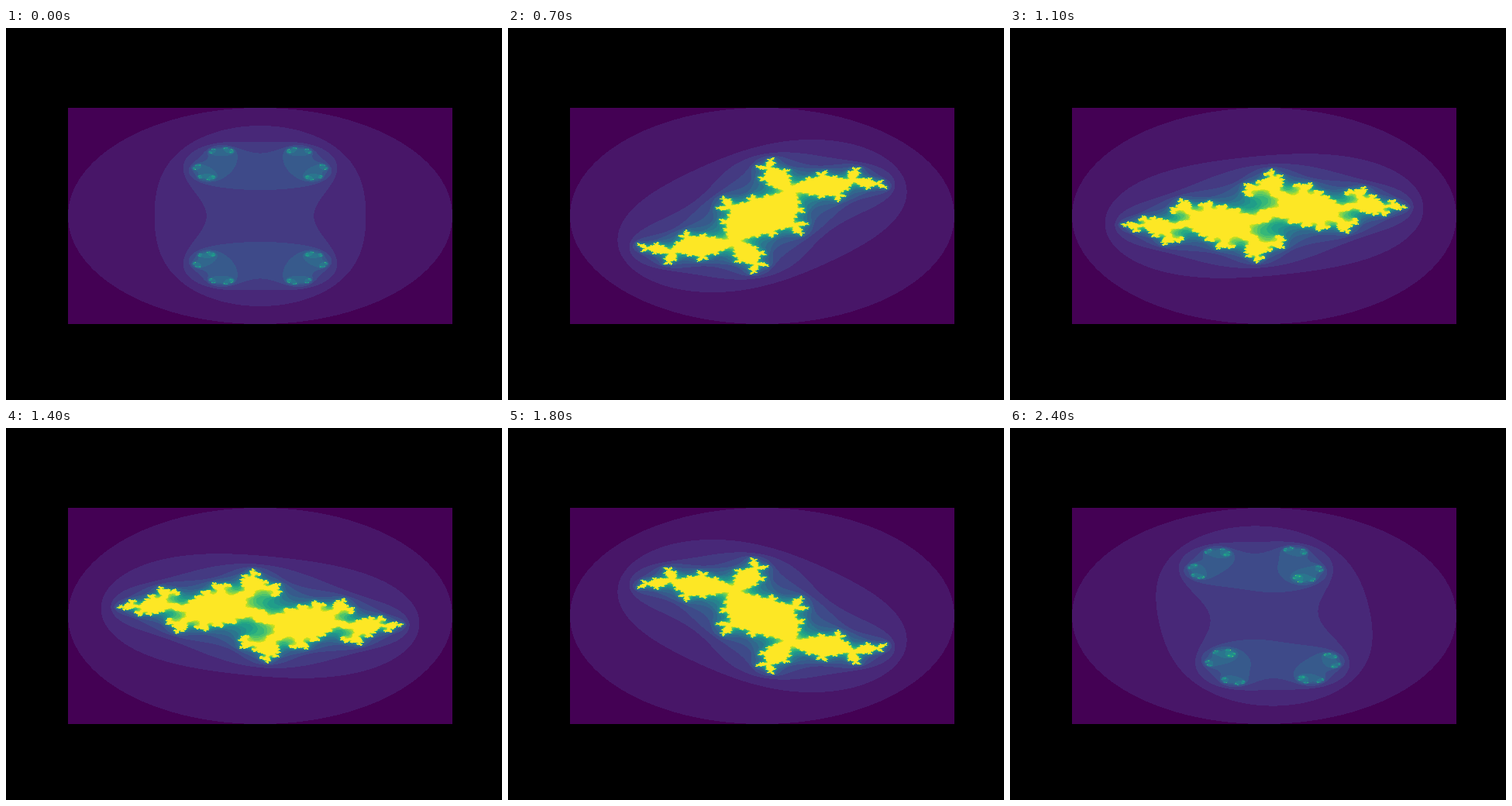
An HTML page with a canvas for the animation above (2.5 s loop, 640 by 480 pixels).

```html
<!DOCTYPE html>
<html lang="en">
<head>
<meta charset="utf-8">
<title>Julia sets</title>
<style>
  html, body { margin: 0; width: 100%; height: 100%; overflow: hidden; background: #000; }
  canvas { display: block; }
</style>
</head>
<body>
<canvas id="stage" width="640" height="480"></canvas>
<script>
const ctx = document.getElementById('stage').getContext('2d');

const LEFT = 80, TOP = 103, W = 496, H = 279;
const STEPS = 25, STEP_MS = 100;
const RADIUS = 0.7885, MAX_ITER = 18;

// Viridis, evenly spaced stops
const STOPS = ('440154 481567 482677 453781 404788 39568c 33638d 2d708e 287d8e 238a8d ' +
  '1f968b 20a387 29af7f 3cbb75 55c667 73d055 95d840 b8de29 dce319 fde725')
  .split(' ').map(hex => [0, 2, 4].map(i => parseInt(hex.substr(i, 2), 16)));

function viridis(t) {
  const pos = t * (STOPS.length - 1);
  const i = Math.min(Math.floor(pos), STOPS.length - 2);
  return STOPS[i].map((a, k) => Math.round(a + (STOPS[i + 1][k] - a) * (pos - i)));
}

const palette = Array.from({ length: MAX_ITER + 1 }, (_, n) => viridis(n / MAX_ITER));

// Number of iterations of z -> z^2 + c before |z| exceeds 2
function escapeTime(x, y, cx, cy) {
  let n = 0;
  while (n < MAX_ITER && x * x + y * y <= 4) {
    const next = x * x - y * y + cx;
    y = 2 * x * y + cy;
    x = next;
    n++;
  }
  return n;
}

function renderJulia(angle) {
  const cx = RADIUS * Math.cos(angle), cy = RADIUS * Math.sin(angle);
  const img = ctx.createImageData(W, H);
  let p = 0;
  for (let row = 0; row < H; row++) {
    const y = -2 + 4 * (row + 0.5) / H;
    for (let col = 0; col < W; col++) {
      const x = -2 + 4 * (col + 0.5) / W;
      const rgb = palette[escapeTime(x, y, cx, cy)];
      img.data[p++] = rgb[0];
      img.data[p++] = rgb[1];
      img.data[p++] = rgb[2];
      img.data[p++] = 255;
    }
  }
  return img;
}

const images = Array.from({ length: STEPS }, (_, i) => renderJulia(2 * Math.PI * i / STEPS));

ctx.fillStyle = '#000';
ctx.fillRect(0, 0, 640, 480);

const start = performance.now();
let shown = -1;

function tick() {
  const step = Math.floor((performance.now() - start) / STEP_MS) % STEPS;
  if (step !== shown) {
    ctx.putImageData(images[step], LEFT, TOP);
    shown = step;
  }
  requestAnimationFrame(tick);
}
tick();
</script>
</body>
</html>
```
